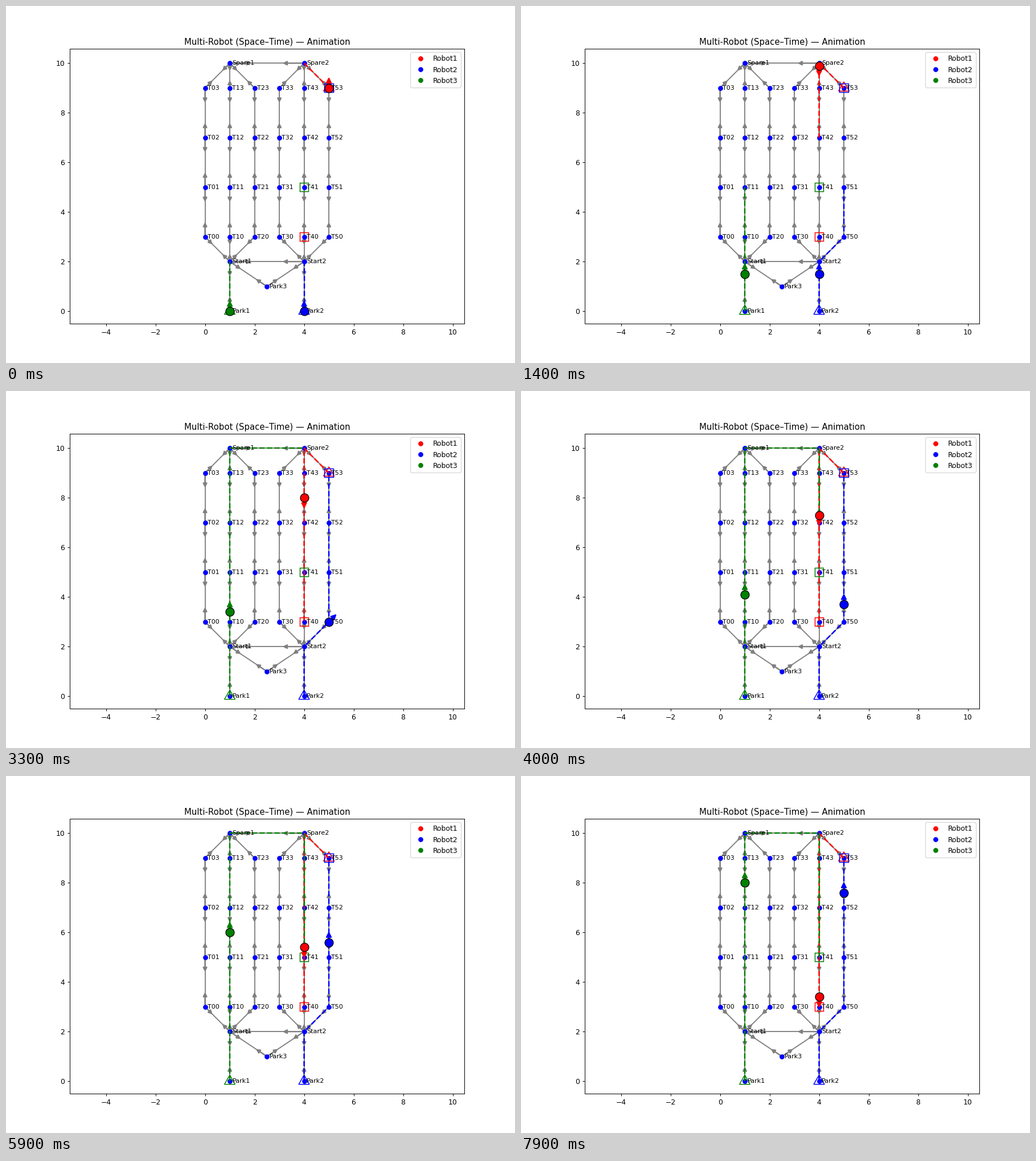
A matplotlib script for the animation above (8 s loop, 894x626 px).

```python
import numpy as np
import matplotlib.pyplot as plt
from matplotlib.animation import FuncAnimation
from matplotlib.patches import FancyArrow, RegularPolygon

FRAMES, INTERVAL = 80, 100
STEP = 0.1          # distance covered per tick
TICKS_PER_NODE = 5  # ticks between path extensions

# Road map
nodes = {"Spare1": (1, 10), "Spare2": (4, 10), "Start1": (1, 2), "Start2": (4, 2),
         "Park1": (1, 0), "Park2": (4, 0), "Park3": (2.5, 1)}
edges = [("Spare1", "Spare2"), ("Start1", "Start2"), ("Park1", "Start1"),
         ("Park2", "Start2"), ("Park3", "Start1"), ("Park3", "Start2")]
for col in range(6):
    names = [f"T{col}{row}" for row in range(4)]
    nodes.update({n: (col, 3 + 2 * row) for row, n in enumerate(names)})
    side = 1 + col // 3
    chain = [f"Start{side}", *names, f"Spare{side}"]
    edges += zip(chain, chain[1:])

routes = {
    "red": "T53 Spare2 T43 T42 T41 T40",
    "blue": "Park2 Start2 T50 T51 T52 T53",
    "green": "Park1 Start1 T10 T11 T12 T13 Spare1 Spare2 T43 T42 T41",
}

fig, ax = plt.subplots(figsize=(10, 7), dpi=89.43)
ax.set_title("Multi-Robot (Space–Time) — Animation")
ax.set_ylim(-0.50375, 10.57875)
ax.set_xlim(2.5 - 7.9675, 2.5 + 7.9675)
ax.set_xticks(range(-4, 11, 2))
ax.set_yticks(range(0, 11, 2))


def add_arrow(p, d, color, size, z):
    arrow = FancyArrow(*p, *d, width=0.001, head_width=size, head_length=size,
                       length_includes_head=True, color=color, lw=1.5, zorder=z)
    return ax.add_patch(arrow)


def add_outline(p, sides, color, turn=0):
    ax.add_patch(RegularPolygon(p, sides, radius=0.25, orientation=turn,
                                fill=False, ec=color, lw=1.2, zorder=2.2))


for a, b in edges:
    p, q = np.array(nodes[a], float), np.array(nodes[b], float)
    ax.plot(*zip(p, q), color="gray", lw=1.5, zorder=0.8)
    add_arrow(p, 0.275 * (q - p), "gray", 0.15, 0.9)
    add_arrow(q, 0.275 * (p - q), "gray", 0.15, 0.9)

ax.plot(*zip(*nodes.values()), "o", color="blue", zorder=1)
for name, (x, y) in nodes.items():
    ax.text(x + 0.1, y, name, fontsize=9, va="center", zorder=3)


class Robot:
    def __init__(self, number, color, route):
        self.way = np.array([nodes[n] for n in route.split()], float)
        self.track = [self.way[0]]
        for p, q in zip(self.way, self.way[1:]):
            n = int(np.hypot(*(q - p)) / STEP + 1e-6)
            self.track += [p + (q - p) * k / n for k in range(1, n + 1)]
        add_outline(self.way[0], 3, color)
        add_outline(self.way[-1], 4, color, np.pi / 4)
        ax.plot([], [], "o", color=color, label=f"Robot{number}")
        self.line, = ax.plot([], [], "--", color=color, lw=2, zorder=2)
        self.arrow = add_arrow(self.way[0], (0, 0.4), color, 0.2, 2.5)
        self.body, = ax.plot([], [], "o", color=color, ms=12, mec="black",
                             mew=1, zorder=5)

    def show(self, tick):
        step = tick + 1 if tick else 0
        pos = self.track[step]
        head = pos - self.track[step - 1] if step else np.array([0, 1.0])
        dx, dy = 0.4 * head / np.hypot(*head)
        self.line.set_data(*self.way[:tick // TICKS_PER_NODE + 2].T)
        self.arrow.set_data(x=pos[0], y=pos[1], dx=dx, dy=dy)
        self.body.set_data([pos[0]], [pos[1]])
        return self.line, self.arrow, self.body


robots = [Robot(i, c, r) for i, (c, r) in enumerate(routes.items(), 1)]
ax.legend(loc="upper right")


def update(tick):
    return [artist for robot in robots for artist in robot.show(tick)]


anim = FuncAnimation(fig, update, frames=FRAMES, interval=INTERVAL,
                     repeat=True, repeat_delay=0)
plt.show()
```
